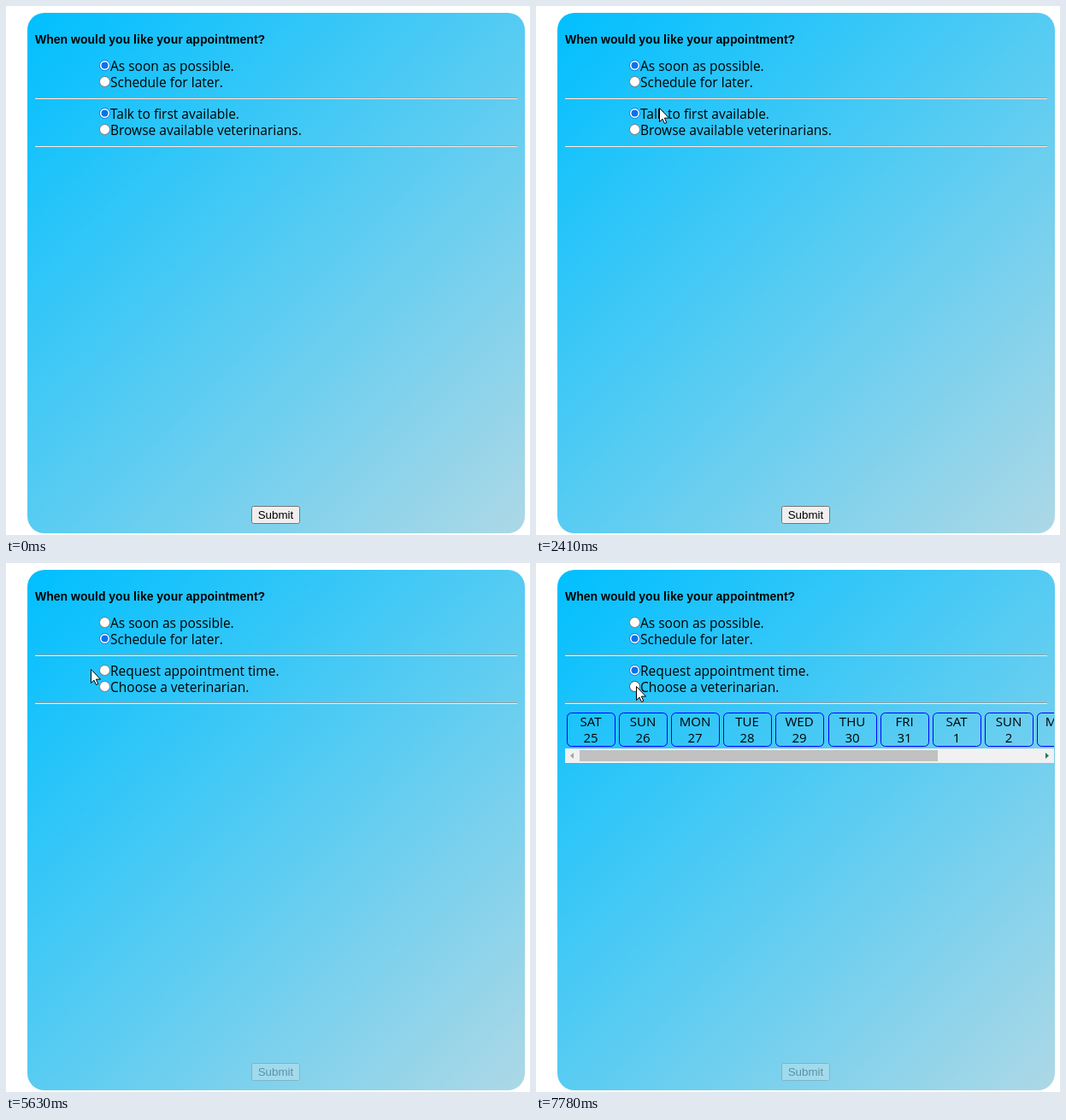
Write an HTML page that moves like this. It is 613 by 619 pixels and loops after 8000 ms.

```html
<!DOCTYPE html>
<html lang="en">
<head>
<meta charset="utf-8">
<title>Appointment form</title>
<style>
  html, body { margin: 0; width: 100%; height: 100%; overflow: hidden; background: #fff; }
  svg { display: block; }
  text { font: 15.5px "Open Sans", "Noto Sans", sans-serif; }
  .heading { font: bold 14px "Liberation Sans", Arial, sans-serif; }
  .submit text { font: 13.333px "Liberation Sans", Arial, sans-serif; }
  .submit rect { fill: #efefef; stroke: #767676; }
  .submit.disabled { opacity: .3; }
  .ring { fill: #fff; stroke: #767676; }
  .dot { fill: none; }
  .hover .ring { stroke: #4f4f4f; }
  .checked .ring { stroke: #0873e8; }
  .checked .dot { fill: #0873e8; }
  .checked.hover .ring { stroke: #005cc8; }
  .checked.hover .dot { fill: #005cc8; }
  .day rect { fill: none; stroke: #00f; }
  .day text { font-size: 15px; text-anchor: middle; }
</style>
</head>
<body>
<svg width="613" height="619" viewBox="0 0 613 619">
  <defs>
    <linearGradient id="sky" gradientUnits="userSpaceOnUse" x1="18.25" y1="14.75" x2="613.75" y2="610.25">
      <stop stop-color="#00bfff"/>
      <stop offset="1" stop-color="#add8e6"/>
    </linearGradient>
    <clipPath id="strip"><rect x="34" y="170" width="572" height="64"/></clipPath>
  </defs>
  <rect x="25" y="8" width="582" height="609" rx="20" fill="url(#sky)"/>
  <text class="heading" x="34" y="44">When would you like your appointment?</text>
  <g id="options"></g>
  <g id="calendar" clip-path="url(#strip)">
    <g id="days"></g>
    <path d="M34 217h572v17h-572z" fill="#f1f1f1"/>
    <path d="M51 219h419v13h-419z" fill="#c1c1c1"/>
    <path d="M44 222v7l-4-3.5z" fill="#a3a3a3"/>
    <path d="M596 222v7l4-3.5z" fill="#1d7a5c"/>
  </g>
  <g id="submit" class="submit">
    <rect x="287.5" y="585.5" width="56" height="20" rx="2"/>
    <text x="294.7" y="600">Submit</text>
  </g>
  <path id="cursor" d="M.5.5v16l3.5-3.3 2.5 5.3 2.3-1-2.4-5.4h5.1z" fill="#fff" stroke="#000"/>
  <circle id="click" r="12.5" fill="#ff0" fill-opacity=".5"/>
</svg>
<script>
const LOOP = 8000, TICK = 70, SCHEDULE = 3810, REQUEST = 6850;
const RADIO_X = 115.5, OFFSTAGE = [640, 330];
const $ = id => document.getElementById(id);

// Pointer moves: start and end time, then the place it reaches.
const peek = start => [[start, start, 582, 602], [start + 140, start + 140, ...OFFSTAGE]];
const MOVES = [
  ...peek(520),
  ...peek(840),
  [1710, 2410, 144, 119],
  [2480, 2690, 119, 96],
  [3080, 3210, 114, 90],
  [4810, 5020, 79, 94],
  [5220, 5290, 82, 90],
  [5360, 5630, 99, 124],
  [5700, 5970, 118, 127],
  [7580, 7780, 117, 144]
];

const scheduled = t => t >= SCHEDULE, requested = t => t >= REQUEST;
const clicking = t => t >= SCHEDULE - TICK && t < SCHEDULE || t >= REQUEST - 2 * TICK && t < REQUEST;

const OPTIONS = [
  { label: () => "As soon as possible.", checked: t => !scheduled(t) },
  { label: () => "Schedule for later.", checked: scheduled },
  { label: t => scheduled(t) ? "Request appointment time." : "Talk to first available.",
    checked: t => !scheduled(t) || requested(t) },
  { label: t => scheduled(t) ? "Choose a veterinarian." : "Browse available veterinarians.",
    checked: () => false }
];

// Two groups of two options, each group closed by an engraved line.
OPTIONS.forEach((option, i) => {
  const top = 56 * Math.floor(i / 2), y = option.y = 69.5 + top + 19 * (i % 2);
  $("options").innerHTML += `<g>
    <circle class="ring" cx="${RADIO_X}" cy="${y}" r="6"/><circle class="dot" cx="${RADIO_X}" cy="${y}" r="4"/>
    <text x="122" y="${y + 6.5}"></text></g>`;
  if (i % 2) $("options").innerHTML += `<g class="rule">
    <path d="M34 ${107 + top}h564v1h-564z" fill="#9a9a9a"/>
    <path d="M34 ${108 + top}h564v1h-564z" fill="#eee"/></g>`;
});
document.querySelectorAll("#options > g:not(.rule)").forEach((node, i) => OPTIONS[i].node = node);

const WEEK = ["SAT", "SUN", "MON", "TUE", "WED", "THU", "FRI"];
$("days").innerHTML = Array.from({ length: 10 }, (_, i) => {
  const x = Math.round(36 + i * 61.1);
  return `<g class="day"><rect x="${x + .5}" y="175.5" width="56" height="39" rx="5"/>
    <text x="${x + 28}" y="191">${WEEK[i % 7]}</text>
    <text x="${x + 28}" y="210">${(24 + i) % 31 + 1}</text></g>`;
}).join("");

// Each move eases out from the last place in steps of one tick.
function pointerAt(t) {
  let place = OFFSTAGE;
  for (const [start, end, ...goal] of MOVES) {
    if (t < start) break;
    const steps = Math.round((end - start) / TICK) + 1;
    const passed = end > start ? Math.floor((t - start) / (end - start) * (steps - 1) + .02) : 0;
    const eased = 1 - Math.max(0, 1 - (passed + 1) / steps) ** 1.4;
    place = place.map((v, k) => Math.round(v + (goal[k] - v) * eased));
  }
  return place;
}

function draw() {
  const t = performance.now() % LOOP;
  const [x, y] = pointerAt(t);
  for (const option of OPTIONS) {
    const { node } = option, text = node.lastElementChild, label = option.label(t);
    node.classList.toggle("checked", option.checked(t));
    node.classList.toggle("hover", Math.hypot(x - RADIO_X, y - option.y) < 6.5);
    if (text.textContent !== label) text.textContent = label;
  }
  $("calendar").style.display = requested(t) ? "" : "none";
  $("submit").classList.toggle("disabled", scheduled(t));
  $("cursor").setAttribute("transform", `translate(${x} ${y})`);
  $("click").setAttribute("transform", `translate(${x + .5} ${y + .5})`);
  $("click").style.display = clicking(t) ? "" : "none";
  requestAnimationFrame(draw);
}
draw();
</script>
</body>
</html>
```
